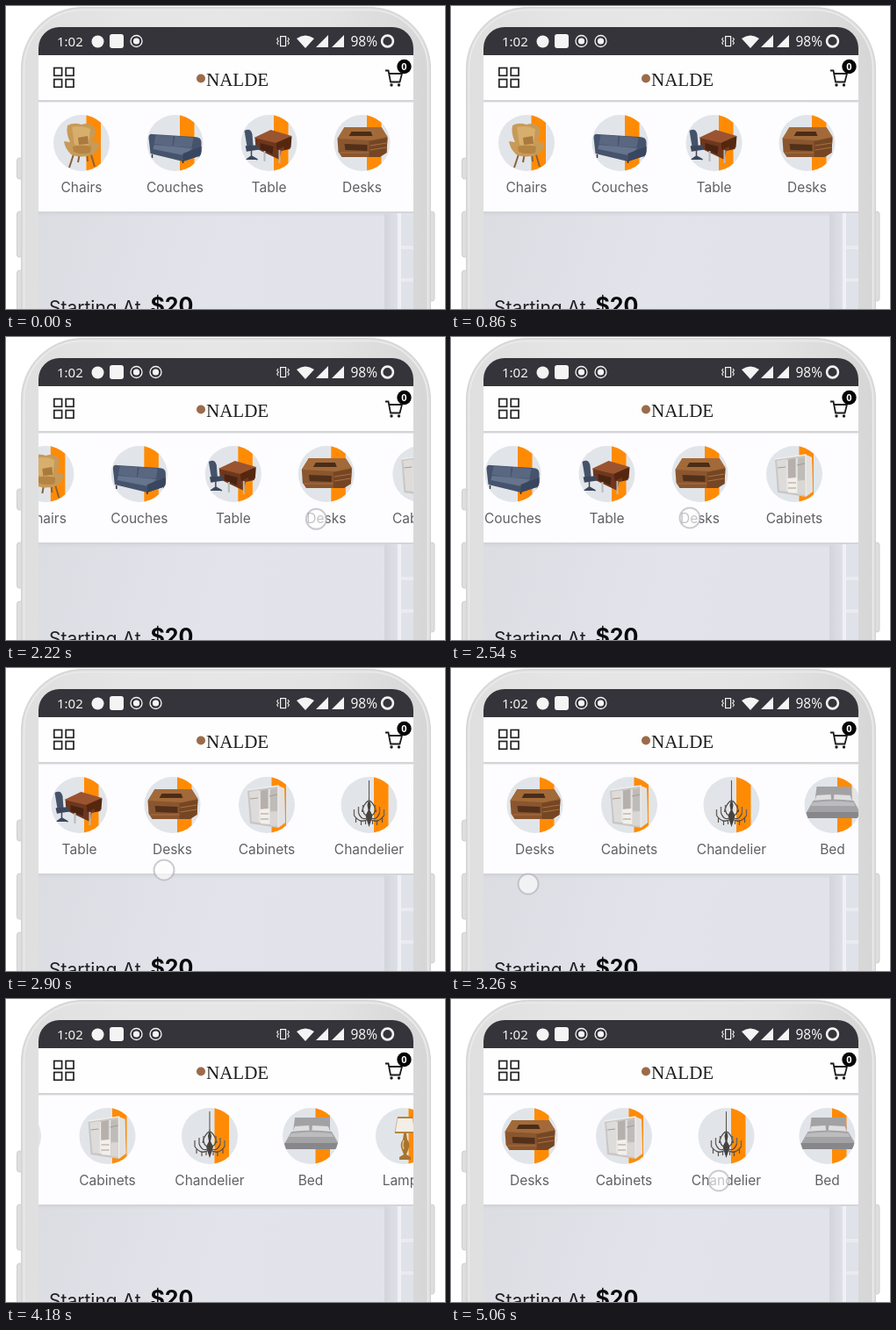
An HTML page with a canvas that plays this animation: 500x345 px, repeating every 5100 ms.

```html
<!DOCTYPE html>
<html lang="en">
<head>
<meta charset="utf-8">
<title>Furniture shop on a phone</title>
<style>
  html, body { margin: 0; width: 100%; height: 100%; overflow: hidden; background: #fff; }
  canvas { display: block; width: 500px; height: 345px; }
</style>
</head>
<body>
<canvas id="stage" width="500" height="345"></canvas>
<script>
const ctx = document.getElementById('stage').getContext('2d');
const LOOP = 5100, STEP = 40;

// Drawing helpers
function box(x, y, w, h, fill) {
  ctx.fillStyle = fill;
  ctx.fillRect(x, y, w, h);
}
function rounded(x, y, w, h, r, fill, stroke, width = 1) {
  ctx.beginPath();
  ctx.roundRect(x, y, w, h, r);
  paint(fill, stroke, width);
}
function disc(x, y, r, fill, stroke, width = 1) {
  ctx.beginPath();
  ctx.arc(x, y, r, 0, Math.PI * 2);
  paint(fill, stroke, width);
}
function shape(d, fill, stroke, width = 1) {
  const path = new Path2D(d);
  if (fill) { ctx.fillStyle = fill; ctx.fill(path); }
  if (stroke) { ctx.strokeStyle = stroke; ctx.lineWidth = width; ctx.stroke(path); }
}
function paint(fill, stroke, width) {
  if (fill) { ctx.fillStyle = fill; ctx.fill(); }
  if (stroke) { ctx.strokeStyle = stroke; ctx.lineWidth = width; ctx.stroke(); }
}
function text(str, x, y, font, fill, align = 'left') {
  ctx.font = font;
  ctx.fillStyle = fill;
  ctx.textAlign = align;
  ctx.fillText(str, x, y);
}
function fade(x0, y0, x1, y1, ...colors) {
  const g = ctx.createLinearGradient(x0, y0, x1, y1);
  colors.forEach((c, i) => g.addColorStop(i / (colors.length - 1), c));
  return g;
}

// Furniture, drawn around the centre of its circle
function chair() {
  shape('M-8 10L-14 28M10 10L15 27M-2 11L-4 22M6 11L7 21', null, '#8a6138', 2);
  shape('M-16-20Q-9-24 0-21Q10-24 15-17Q17-8 12-2L21 0Q19 9 13 13Q0 18-12 13Q-19 6-20-2L-13-1Q-18-11-16-20Z', '#c79a58');
  shape('M-11-18Q0-21 10-16L8 2Q0 4-8 2Z', '#d8ae6c');
  shape('M-10 4Q1 1 11 4L10 11Q0 14-9 10Z', '#b58443');
  shape('M-4-6L7-8 8 1-3 2Z', '#a9793e');
}
function couch() {
  shape('M-30-6Q-30-11-25-10L22-7Q30-7 30-1L30 14 9 21-28 12Z', '#46536c');
  shape('M-22-9L-2-8-3 4-24 1ZM0-8L21-6 19 5-2 4Z', '#596781');
  shape('M-24 2L20 6 10 14-25 7Z', '#66748d');
  shape('M9 12L30 4 30 14 9 21Z', '#394660');
  shape('M-26 13V17M9 20V23M28 15V18', null, '#333', 1.5);
}
function table() {
  shape('M-16-6L2-14 25-7 24 7 14 9 12 19-7 10-15 6Z', '#6e371d');
  shape('M-17-6L2-15 26-8 8 0Z', '#9b5430');
  shape('M8 0L26-8 25 5 18 8 17 4 9 8Z', '#55270f');
  shape('M-10 0L5 4 4 13-10 7Z', '#4a2413');
  shape('M12 8V23M-5 9V21', null, '#b8b9bd', 2);
  shape('M-28-14Q-21-18-19-10L-18 3-25 4Z', '#45536a');
  shape('M-26 4L-13 3-12 7-25 9ZM-20 8V15M-26 19L-20 15-13 19', '#3c485d', '#3c485d', 1.5);
}
function desk() {
  shape('M-28-5L-20-18H22L29-7 28 11 20 16H-23L-27 10Z', '#8a562f');
  shape('M-28-5L-20-18H22L29-7 10-3Z', '#a36a39');
  shape('M-12-13H10L12-8H-15Z', '#4b2c18');
  shape('M-20 1L6 2V9L-19 8Z', '#52301a');
  shape('M8-2L29-6 28 11 20 16H8Z', '#754624');
  shape('M9 3L28 0M9 8L28 5M-25 11H8', null, '#aa7040', 1);
}
function cabinet() {
  shape('M-22-17L13-22 20-19 21 20 13 26-19 21Z', '#c9c6c4');
  shape('M-20-15L-9-17-8 20-17 19Z', '#dedcda');
  shape('M-8-16L1-18V4L-7 5Z', '#b5b0ac');
  shape('M3-17L12-19V7L3 6Z', '#bfbbb8');
  shape('M-8 5L3 4V22L-7 21Z', '#f3efea');
  shape('M4 8L12 7V24L4 23Z', '#d9d6d3');
  shape('M13-22L20-19 21 20 13 26Z', '#e3e1df');
  shape('M-22-17L13-22V25M-8-16V20M3-18V22', null, '#efeeed', 1.3);
  shape('M-7 10L2 10M-7 16L2 16M-19-7L-10-8M3-10L12-12', null, '#a69b90', 1);
}
function chandelier() {
  shape('M0-28V-6', null, '#5b5653', 1.1);
  shape('M0-8L2 0 1 6 4 12 2 19 0 25-2 19-4 12-1 6-2 0Z', '#46413d');
  for (const side of [-1, 1]) {
    ctx.save();
    ctx.scale(side, 1);
    shape('M1 16Q10 22 17 12M1 14Q8 19 12 9M1 10Q5 14 7 6M1-5Q7 0 8 8', null, '#4c4743', 1.2);
    shape('M17 12V5M12 9V2M7 6V0', null, '#6d655e', 1.4);
    shape('M15 15V20M9 18V23M4 18V22', null, '#5b5149', 1.2);
    ctx.restore();
  }
}
function bed() {
  shape('M-18-21H21L23 3H-21Z', '#a2a2a5');
  shape('M-18-11L-2-12-1-4-21-3ZM2-12L20-11 23-3 1-4Z', '#dededf');
  shape('M-22-5Q0-8 24-5L32 9 30 15H-28L-30 9Z', '#a3a3a6');
  shape('M-22-3Q0-6 24-3L26 1H-25Z', '#bcbcbf');
  shape('M-30 8H32L30 15H-28Z', '#87878b');
}
function lamp() {
  shape('M-7-21H10L13-4H-10Z', '#f3eee6', '#cdb996');
  shape('M-10-5H13V-3H-10ZM-7-22H10V-20H-7Z', '#b6863b');
  shape('M0-3H3L4 4Q8 9 5 16L3 21 8 24V27H-5V24L0 21-2 16Q-5 9-1 4Z', '#a8742f');
  shape('M0 5Q-2 10 0 15', null, '#e2c07c', 1.6);
}

const items = [
  ['Chairs', 86, chair], ['Couches', 192.5, couch],
  ['Table', 299.5, table], ['Desks', 405.5, desk],
  ['Cabinets', 513, cabinet], ['Chandelier', 629.5, chandelier],
  ['Bed', 744.5, bed], ['Lamps', 850.5, lamp]
];

// Motion keys: time, scroll, touch x, touch y
const drag = [[2060, 0, 394, 208], [2540, 122, 272, 206], [2900, 216, 180, 230],
              [3260, 310, 88, 246], [3460, 357, 43, 263]];
const pullBack = [[4580, 397.5, 223, 215], [5060, 316, 305, 207]];

function follow(keys, t) {
  const i = Math.max(1, keys.findIndex(k => k[0] >= t));
  const a = keys[i - 1], b = keys[i];
  const p = (t - a[0]) / (b[0] - a[0]);
  const [, scroll, x, y] = a.map((v, n) => v + (b[n] - v) * p);
  return { scroll, x, y };
}
function pose(t) {
  if (t < 2060) return { scroll: 0 };
  if (t <= 3460) return follow(drag, t);
  if (t <= 4580) {
    const p = Math.min(1, (t - 3460) / 400);
    return { scroll: 357 + 40.5 * (1 - (1 - p) ** 2.4) };
  }
  return follow(pullBack, t);
}

function shell() {
  for (const [x, y, w, h] of [[12.5, 173, 7, 24], [12.5, 234, 7, 52], [12.5, 301, 7, 60], [482, 234, 6, 102]])
    rounded(x, y, w, h, 3, '#dedede', '#cecece');
  rounded(17.5, 1.5, 466, 420, 70, '#dddddd', '#d2d2d2');
  const side = fade(20, 0, 481, 0, '#dfdfdf', '#e5e5e5', '#e6e6e6', '#e3e3e3', '#d6d6d6');
  rounded(20.5, 4.5, 460, 420, 67, side, '#ebebeb', 1.5);
}

function statusBar(t) {
  const white = '#f4f4f5';
  box(37, 24, 427, 32, '#34343a');
  text('1:02', 58, 46, '15px "Noto Sans", sans-serif', white);
  disc(104.5, 40.5, 7, white);
  rounded(118, 32, 16, 16, 3, white);
  for (const x of t < 100 ? [148.5] : [148.5, 170.5]) {
    disc(x, 40, 6.5, null, white, 1.3);
    disc(x, 40, 3.6, white);
  }
  ctx.strokeStyle = white;
  ctx.lineWidth = 1.2;
  ctx.strokeRect(312.6, 34.6, 6, 11);
  shape('M310 36L308.7 38 310.3 40 308.7 42 310 44M321 36L322.4 38 320.8 40 322.4 42 321 44', null, white, 1.1);
  shape('M331 37Q341 30 351 37L341 48Z', white);
  shape('M353 47L367 33V47ZM371 47L385 33V47Z', white);
  text('98%', 392.5, 46, '15.5px "Noto Sans", sans-serif', white);
  disc(434.5, 40, 6.4, null, white, 2.6);
}

function header() {
  box(37, 56, 427, 51, '#fefefe');
  box(37, 107, 427, 2.5, '#d4d5d8');
  ctx.strokeStyle = '#222';
  ctx.lineWidth = 1.7;
  for (const x of [54.8, 68.2])
    for (const y of [70.5, 83.5]) ctx.strokeRect(x, y, 8.8, 8.8);
  disc(222, 82.5, 5, '#9b6b4b');
  text('NALDE', 228, 91, '21px "Liberation Serif", serif', '#1d1d1f');
  shape('M432 73.5H435.5L438 86.5H448.5L451 77H436.5', null, '#1b1b1b', 1.8);
  disc(439, 90, 1.7, '#1b1b1b');
  disc(447.5, 90, 1.7, '#1b1b1b');
  disc(453.5, 69, 8.2, '#050505');
  text('0', 453.5, 73, 'bold 11px "Open Sans", sans-serif', '#fff', 'center');
}

function category(name, x, draw) {
  ctx.save();
  ctx.translate(x, 156);
  ctx.save();
  disc(0, 0, 32, '#e1e5e9');
  ctx.clip();
  box(5.5, -32, 16.5, 64, '#ff8b05');
  draw();
  ctx.restore();
  text(name, 0, 56, '15.5px Inter, sans-serif', '#606064', 'center');
  ctx.restore();
}

function banner() {
  box(37, 234, 427, 111, fade(37, 234, 432, 345, '#dcdde3', '#e3e4eb', '#e2e3ea'));
  box(37, 234, 427, 6, fade(0, 234, 0, 240, '#d0d1d5', 'rgba(214,215,222,0)'));
  box(431, 236, 15, 109, fade(431, 0, 446, 0, '#d3d5dd', '#dfe0e7'));
  box(446, 236, 4, 109, '#f0f1f5');
  box(450, 236, 14, 109, '#e0e2e9');
  box(450, 273, 14, 4, '#eaebf1');
  box(450, 310, 14, 4, '#eaebf1');
  text('Starting At', 49, 351, '21px Inter, sans-serif', '#202024');
  text('$20', 164.5, 349.5, 'bold 25px Inter, sans-serif', '#09090b');
}

function render(t) {
  const { scroll, x, y } = pose(t);
  box(0, 0, 500, 345, '#fff');
  shell();
  ctx.save();
  ctx.beginPath();
  ctx.roundRect(37, 24, 427, 400, 24);
  ctx.clip();
  statusBar(t);
  header();
  box(37, 109.5, 427, 124.5, '#fdfcfe');
  for (const [name, left, draw] of items) {
    const at = left - scroll;
    if (at > -20 && at < 520) category(name, at, draw);
  }
  banner();
  if (x !== undefined) disc(x, y, 11.5, 'rgba(255,255,255,.62)', 'rgba(168,170,180,.6)', 2);
  ctx.restore();
}

function frame(now) {
  const t = now % LOOP;
  render(Math.max(0, Math.floor((t - 20) / STEP) * STEP + 20));
  requestAnimationFrame(frame);
}
requestAnimationFrame(frame);
</script>
</body>
</html>
```
